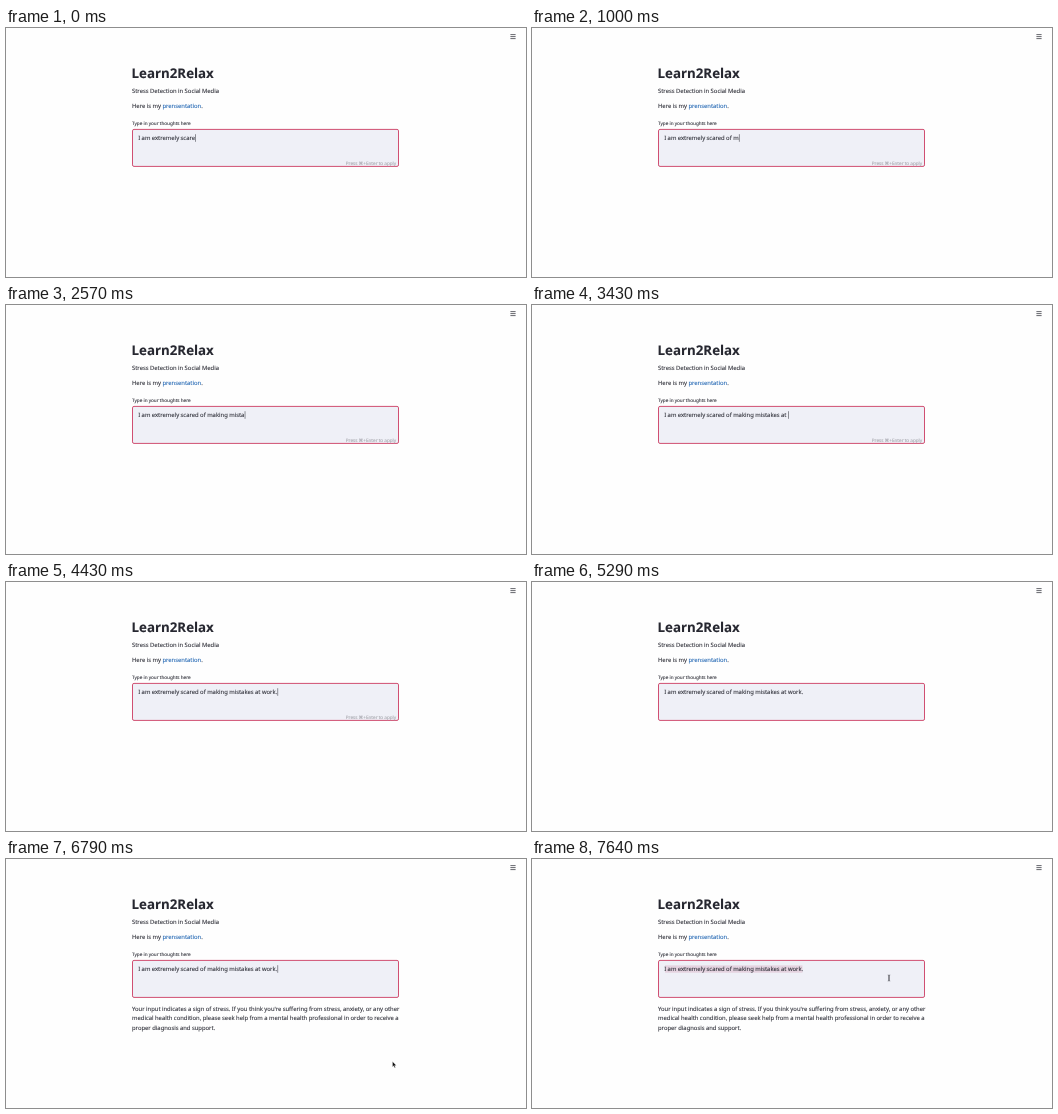
Recreate the animation shown at these times as an HTML page. Size 520 px wide and 249 px high, loop 7.71 s.

```html
<!DOCTYPE html>
<html lang="en">
<head>
<meta charset="utf-8">
<title>Learn2Relax</title>
<style>
  html, body { margin: 0; width: 100%; height: 100%; overflow: hidden; background: #fefefe; }
  svg { display: block; width: 100%; height: 100%; }
  text {
    font: 5.86px "Noto Sans", "DejaVu Sans", sans-serif;
    word-spacing: -.08px;
    color: #30313a;
    fill: currentColor;
    stroke: currentColor;
    stroke-width: .1;
    white-space: pre;
    text-rendering: geometricPrecision;
  }
  .title { font-size: 13.3px; font-weight: 700; color: #262730; }
  .small { font-size: 4.65px; }
  .link { fill: #2468b4; stroke: #2468b4; }
  .muted { color: #a6a7ae; }
  .faint { color: #bdbec5; }
  .box { fill: #eff0f7; stroke: #d04f72; }
  .button { fill: none; stroke: #f0f0f3; stroke-width: .7; }
  .runner { fill: none; stroke: #85868e; stroke-width: .8; stroke-linecap: round; stroke-linejoin: round; }
</style>
</head>
<body>
<svg viewBox="0 0 520 249">
  <path d="M504.4 6.6h5.2M504.4 8.6h5.2M504.4 10.6h5.2" stroke="#4a4b53" stroke-width=".85"/>

  <g id="status">
    <g class="runner">
      <circle cx="435.3" cy="4.9" r=".7" fill="#85868e" stroke="none"/>
      <path id="limbs"/>
    </g>
    <text class="small faint" x="442.5" y="10.2">RUNNING...</text>
    <rect class="button" x="472.3" y="1.7" width="23.2" height="12.6" rx="1.5"/>
    <text class="small" x="479" y="10.1">Stop</text>
  </g>

  <text class="title" x="125.6" y="49.6">Learn2Relax</text>
  <text x="126" y="64.8">Stress Detection in Social Media</text>
  <text x="126" y="80.4">Here is my <tspan class="link">prensentation</tspan>.</text>
  <text class="small" x="126" y="96.5">Type in your thoughts here</text>

  <rect class="box" x="126.5" y="101.4" width="266" height="37" rx="1.5"/>
  <rect id="selection" x="133" y="106.4" width="137.5" height="7.3" fill="#e5d3e0"/>
  <text id="typed" x="132.2" y="112.1"></text>
  <rect id="caret" y="106.2" width=".6" height="7.6" fill="#4a4b53"/>
  <text id="hint" class="small muted" x="390.2" y="136.5" text-anchor="end">Press ⌘+Enter to apply</text>

  <g id="result">
    <text x="126" y="151.5">Your input indicates a sign of stress. If you think you're suffering from stress, anxiety, or any other</text>
    <text x="126" y="161.1">medical health condition, please seek help from a mental health professional in order to receive a</text>
    <text x="126" y="170.7">proper diagnosis and support.</text>
  </g>

  <path id="arrow" d="M0 0v5.4l1.2-1.1.9 2 .9-.4-.9-1.9h1.7z" fill="#111" stroke="#fff" stroke-width=".3"/>
  <path id="beam" d="M-1.2-3q1.2 0 1.2.8v4.4q0 .8-1.2.8M1.2-3q-1.2 0-1.2.8v4.4q0 .8 1.2.8" fill="none" stroke="#33343c" stroke-width=".6"/>
</svg>
<script>
const LOOP = 7710;
const MESSAGE = 'I am extremely scared of making mistakes at work.';
const START = 'I am extremely scare'.length;

// Time of each further keystroke
const KEYS = [
  140, 280, 430, 570, 710,
  1000, 1140, 1280, 1360, 1430, 1570, 1710, 1860,
  2070, 2210, 2350, 2480, 2610, 2740, 2870, 3000,
  3140, 3280, 3430, 3640, 3780, 3930, 4070,
  4430
];

// Mouse stops: time, x, y
const MOUSE = [
  [6570, 404, 203.2], [6640, 397, 203.2], [6710, 391, 202.8], [6790, 386.5, 202.5],
  [6860, 384, 194], [6930, 378, 176], [7000, 370, 152],
  [7070, 363, 134], [7140, 359, 124], [7500, 357, 119]
];

const STRIDES = [
  'M434.7 6.2L433.8 8.6M432.2 7.4L433 6.3L434.7 6.2L435.6 7.4L436.8 7.1M433.8 8.6L435.3 9.7L434.9 11.5M433.8 8.6L432.9 10.1L431.3 10.4',
  'M434.7 6.2L433.8 8.6M433.2 8L433.4 6.6L434.7 6.2L435.2 7.6L436.1 7.4M433.8 8.6L434.6 10L433.9 11.6M433.8 8.6L434 10.2L432.3 11',
  'M434.7 6.2L433.8 8.6M432.5 7.8L433.2 6.4L434.7 6.2L435.4 7.5L436.5 7.2M433.8 8.6L435.5 9.3L435.6 11M433.8 8.6L433.1 10.2L431.6 11.2'
];

const el = id => document.getElementById(id);
const [status, limbs, selection, typed, caret, hint, result, arrow, beam] =
  ['status', 'limbs', 'selection', 'typed', 'caret', 'hint', 'result', 'arrow', 'beam'].map(el);

const show = (node, on) => node.setAttribute('visibility', on ? 'visible' : 'hidden');
const within = (t, from, to) => t >= from && t < to;

function drawText(t) {
  const value = MESSAGE.slice(0, START + KEYS.filter(k => k <= t).length);
  if (typed.textContent !== value) typed.textContent = value;
  caret.setAttribute('x', 132.5 + typed.getComputedTextLength());
  show(caret, t < 5000 || within(t, 5500, 6000) || within(t, 6500, 7000));
  show(selection, t >= 7640);
}

function drawMouse(t) {
  const stop = MOUSE.filter(m => m[0] <= t).pop();
  const overBox = stop && stop[2] < 139;
  show(arrow, stop && !overBox);
  show(beam, overBox);
  if (stop) (overBox ? beam : arrow).setAttribute('transform', `translate(${stop[1]} ${stop[2]})`);
}

function draw(t) {
  drawText(t);
  drawMouse(t);
  show(hint, t < 5140);
  show(status, within(t, 5570, 6070));
  show(result, t >= 5640);
  const stride = Math.max(0, Math.floor((t - 5570) / 72));
  limbs.setAttribute('d', STRIDES[stride % STRIDES.length]);
}

const start = performance.now();
function tick() {
  draw((performance.now() - start) % LOOP);
  requestAnimationFrame(tick);
}
tick();
</script>
</body>
</html>
```
